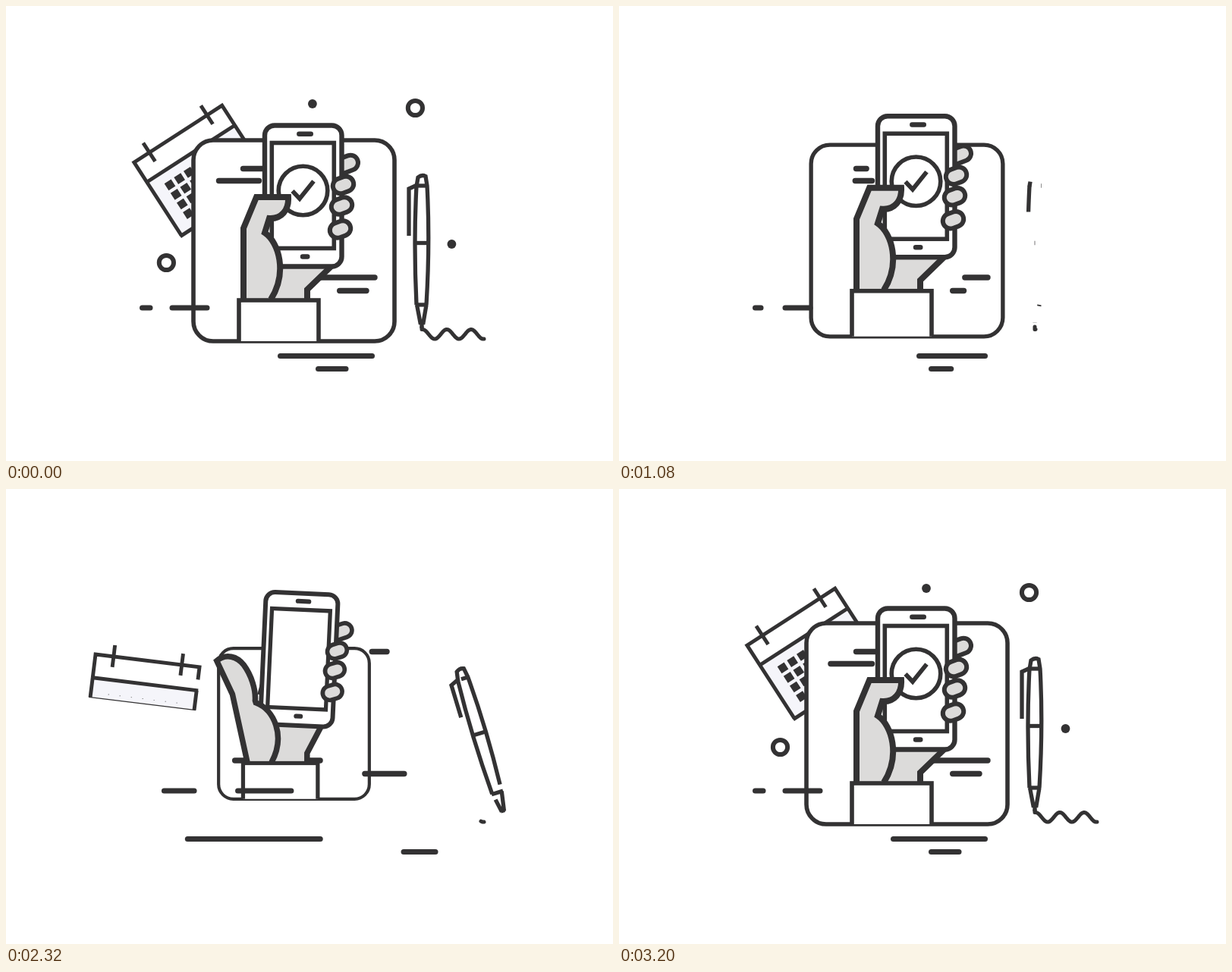
An HTML page that plays this animation: 800x600 px, repeating every 3240 ms.

```html
<!DOCTYPE html>
<html lang="en">
<head>
<meta charset="utf-8">
<title>Phone approval loop</title>
<style>
  html, body { margin: 0; width: 100%; height: 100%; overflow: hidden; background: #fff; }
  svg { display: block; width: 100vw; height: 100vh; }
</style>
</head>
<body>
<svg viewBox="0 0 800 600" fill="none" stroke="#333233" stroke-miterlimit="6">
  <defs>
    <clipPath id="window"><path id="windowShape"/></clipPath>
  </defs>

  <g id="calendar" stroke-width="4.9">
    <rect id="page" x="0" y="31" width="138" fill="#f5f5fa" stroke="none"/>
    <g id="cells" fill="#333233" stroke="none"></g>
    <path id="pageSides"/>
    <path id="pageFoot"/>
    <path id="header" pathLength="1" d="M0 31V0H138V31"/>
    <path id="divider" pathLength="1" d="M140 31H-2"/>
    <path id="pinLeft" pathLength="1" d="M24 -15V14"/>
    <path id="pinRight" pathLength="1" d="M114.5 -15V14"/>
  </g>

  <rect id="card" x="-132.5" y="-132.5" width="265" height="265" rx="26" fill="#fff" stroke-width="5.6"/>
  <g id="linesBack" stroke-width="7.4" stroke-linecap="round"></g>

  <g id="handLayer" clip-path="url(#window)">
    <g id="hand">
      <path id="wrist" fill="#dcdbda" stroke="none"/>
      <path id="wristEdge" stroke-width="8"/>
      <g id="phone">
        <g id="indexFinger"></g>
        <rect x="341" y="157.5" width="101.5" height="186" rx="13" fill="#fff" stroke-width="6.4"/>
        <path d="M386.3 168.7H401.8M391 330.5H397.3" stroke-width="6.4" stroke-linecap="round"/>
        <rect x="350.3" y="180.5" width="82" height="139" fill="#fff" stroke-width="5.6"/>
        <g id="badge"><circle r="32.3" fill="#fff" stroke-width="5.6"/></g>
        <path id="check" pathLength="1" d="M377.5 244L387 254L405.5 231" stroke-width="5.8"/>
        <g id="fingers"></g>
      </g>
      <path id="thumb" fill="#dcdbda" stroke-width="8"/>
      <rect x="307" y="388" width="105" height="260" fill="#fff" stroke-width="5.6"/>
    </g>
  </g>

  <g id="linesFront" stroke-width="7" stroke-linecap="round"></g>
  <path id="wave" stroke-width="5" stroke-linecap="round" stroke-linejoin="round"/>
  <g id="pen" stroke-width="5.3"></g>
  <g id="floaters"></g>
</svg>

<script>
const LOOP = 3240, ENTRY = 1840, CX = 379.5, CY = 309.5, DARK = '#333233', SKIN = '#dcdbda';
const $ = id => document.getElementById(id);
const clamp = u => Math.max(0, Math.min(1, u));
const mix = (a, b, u) => a + (b - a) * u;
const span = (t, start, length) => clamp((t - start) / length);
const easeInOut = u => u < .5 ? 2 * u * u : 1 - 2 * (1 - u) ** 2;
const easeOut = (u, power = 3) => 1 - (1 - u) ** power;
const backIn = (u, pull) => u ** 3 * ((pull + 1) * u - pull);
const show = (el, on) => el.setAttribute('visibility', on ? 'visible' : 'hidden');
const set = (el, attrs) => { for (const k in attrs) el.setAttribute(k, attrs[k]); };

function add(parent, tag, attrs = {}) {
  const el = document.createElementNS('http://www.w3.org/2000/svg', tag);
  set(el, attrs);
  return parent.appendChild(el);
}

// Smooth keyframes [time, ...values] without overshoot.
function track(t, keys) {
  const n = keys.length - 1;
  if (t <= keys[0][0]) return keys[0].slice(1);
  if (t >= keys[n][0]) return keys[n].slice(1);
  let i = 0;
  while (t >= keys[i + 1][0]) i++;
  const slope = (j, c) => (keys[j + 1][c] - keys[j][c]) / (keys[j + 1][0] - keys[j][0]);
  const tangent = (j, c) => {
    if (j === 0 || j === n) return 0;
    const a = slope(j - 1, c), b = slope(j, c);
    return a * b <= 0 ? 0 : 2 * a * b / (a + b);
  };
  const h = keys[i + 1][0] - keys[i][0], u = (t - keys[i][0]) / h;
  return keys[i].slice(1).map((v, k) => {
    const c = k + 1;
    return mix(v, keys[i + 1][c], u * u * (3 - 2 * u))
      + h * u * (1 - u) * ((1 - u) * tangent(i, c) - u * tangent(i + 1, c));
  });
}

// Shows the share p of a path, growing from position c along it.
function trim(el, p, c = 0) {
  const whole = p > .998;
  show(el, p > .002);
  set(el, { 'stroke-dasharray': whole ? 'none' : `${p} 2`, 'stroke-dashoffset': whole ? 0 : -c * (1 - p) });
}

// ---- Calendar: [time, centre x, centre y, angle, scale] ----
const calendarRest = [258, 217, -32.9, 1];
const calendarLeave = [[420, ...calendarRest], [840, 263, 163, 4.2, .885], [1090, 345, 260, 25, .4]];
const calendarEnter = [[2000, 166.4, 174, -8, .86], [2320, 179.5, 283.5, 7, 1],
  [2600, 215, 267.4, -3.3, 1], [2920, ...calendarRest]];
const cells = Array.from({ length: 28 }, (_, i) => {
  const row = Math.floor(i / 7);
  return { row, x: 23.5 + 15.1 * (i % 7), y: 50.5 + 15 * row, el: add($('cells'), 'rect') };
});

function drawCalendar(t) {
  const on = t < 1090 || t >= ENTRY;
  $('calendar').style.display = on ? '' : 'none';
  if (!on) return;
  const [x, y, angle, s] = track(t, t < ENTRY ? calendarLeave : calendarEnter);
  set($('calendar'), { transform: `translate(${x} ${y}) rotate(${angle}) scale(${s}) translate(-69 -57.5)` });

  const T = t < ENTRY ? LOOP : t;
  const [height, foot] = track(T, [[2200, 0, 0], [2320, 26, 1.4], [2560, 84, 4.9]]);
  const bottom = 31 + height;
  for (const id of ['page', 'pageSides', 'pageFoot']) show($(id), height > .5);
  set($('page'), { height });
  set($('pageSides'), { d: `M0 31V${bottom}M138 31V${bottom}` });
  set($('pageFoot'), { d: `M-2 ${bottom}H140`, 'stroke-width': foot });
  for (const { row, x, y, el } of cells) {
    const full = 10.6 * span(T, 2290 + 30 * row, 360);
    const size = y + full / 2 < bottom ? full : 0;
    set(el, { x: x - size / 2, y: y - size / 2, width: size, height: size });
  }
  trim($('divider'), easeOut(span(T, 1880, 230)));
  trim($('header'), span(T, 2010, 334));
  for (const id of ['pinLeft', 'pinRight']) trim($(id), span(T, 1920, 170));
}

// ---- Card, hand and phone ----
const handRise = [[2080, 180], [2320, -21.6], [2600, 19], [2940, 0]];
const phoneTilt = [[2080, -8, -6, -8], [2320, -5.8, -8.3, 2.6], [2600, 6, 7.5, 5.65], [2920, 0, 0, 0]];
const thumbOpen = 'M313 387L292 291L270 244C283 233 299 238 308 250C319 265 325 285 324 300L325 303C351 313 367 350 347 387';
const thumbClosed = 'M313 387L313 293L330 252C345 252 360 252 372 252C373 269 363 281 347 280L341 299C360 312 371 352 349 387';

function addFinger(parent, x1, y1, x2, y2) {
  for (const [stroke, width] of [[DARK, 26], [SKIN, 14]])
    add(parent, 'path', { d: `M${x1} ${y1}L${x2} ${y2}`, stroke, 'stroke-width': width, 'stroke-linecap': 'round' });
}
addFinger($('indexFinger'), 440, 212, 454, 206.7);
for (const [x, y] of [[444.5, 236], [442.5, 263.5], [440.5, 294.5]])
  addFinger($('fingers'), x - 3.7, y + 1.3, x + 3.7, y - 1.3);

// Blends two paths of the same structure; the upper part leans sideways.
function morph(from, to, u, lean) {
  const number = /[\d.]+/g, target = to.match(number).map(Number);
  let i = 0;
  return from.replace(number, v => {
    const shift = i % 2 ? 0 : lean * clamp((305 - target[i + 1]) / 40);
    return mix(+v, target[i++] + shift, u);
  });
}

function drawCardAndHand(t) {
  const entering = t >= ENTRY, T = entering ? t : LOOP;
  const leave = span(t, 560, 860);
  const s = entering ? easeOut(span(t, 2080, 820), 4) : 1 - backIn(leave, 1);
  const on = s > .004;
  $('card').style.display = $('handLayer').style.display = on ? '' : 'none';
  if (!on) return;
  set($('card'), { transform: `translate(${CX} ${CY}) scale(${s})` });

  // The hand may stick out sideways above the middle of the card, never below.
  const h = 132.5 * s, r = 26 * s, L = CX - h, R = CX + h, B = CY + h;
  set($('windowShape'), { d: `M${L - h} -50H${R + h}V${CY}H${R}V${B - r}A${r} ${r} 0 0 1 ${R - r} ${B}` +
    `H${L + r}A${r} ${r} 0 0 1 ${L} ${B - r}V${CY}H${L - h}Z` });

  const dy = entering ? track(t, handRise)[0] : 400 * backIn(leave, 1.88);
  const scale = easeOut(span(T, 2080, 480), 4);
  set($('hand'), { transform: `translate(394 ${CY + dy}) scale(${scale}) translate(-394 ${-CY})` });
  const [px, py, angle] = track(T, phoneTilt);
  set($('phone'), { transform: `translate(${px} ${py}) rotate(${angle} 394 249.5)` });

  const grip = easeInOut(span(T, 2350, 230));
  const heel = `${mix(416, 430, grip)} ${mix(338, 342, grip)}L397 374V390`;
  set($('thumb'), { d: morph(thumbOpen, thumbClosed, grip, angle * 1.2) });
  set($('wrist'), { d: `M320 310L345 300L${heel}H320Z` });
  set($('wristEdge'), { d: `M${heel}M331 292L339 262` });

  const pop = easeOut(span(T, 2420, 160));
  show($('badge'), pop > 0);
  set($('badge'), { transform: `translate(391.5 243.5) scale(${pop})` });
  trim($('check'), easeInOut(span(T, 2640, 200)));
}

// ---- Dashes: one end leads, the other follows; on leaving it joins the leader ----
const dashes = [
  { y: 214.5, from: 502, lead: 312.5, tail: 345, start: 2190 },
  { y: 230.5, from: 250, lead: 333.5, tail: 280.5, start: 2470 },
  { y: 358, from: 299, lead: 486, tail: 414, start: 2000 },
  { y: 375.5, from: 526, lead: 439.7, tail: 475, start: 2000 },
  { y: 398, from: 249, lead: 179.5, tail: 190, start: 2010 },
  { y: 398, from: 376, lead: 219, tail: 265, start: 2050 },
  { y: 461.5, from: 231, lead: 482.5, tail: 361.5, start: 1960 },
  { y: 478.5, from: 566, lead: 411.5, tail: 448, start: 2110 }];
for (const d of dashes) {
  d.outer = d.y > 390;
  d.el = add($(d.outer ? 'linesFront' : 'linesBack'), 'path');
}

function drawDashes(t) {
  for (const { y, from, lead, tail, start, outer, el } of dashes) {
    const entering = t >= ENTRY;
    const a = entering ? mix(from, lead, easeInOut(span(t, start, 570))) : lead;
    const b = entering ? mix(from, tail, easeInOut(span(t, start + 260, 560)))
      : mix(tail, lead, easeInOut(span(t, outer ? 840 : 760, outer ? 640 : 590)));
    show(el, Math.abs(a - b) > .05);
    set(el, { d: `M${a} ${y}H${b}` });
  }
}

// ---- Pen and the wave it writes: [time, centre x, centre y, angle] ----
const penPath = [[2000, 625.5, 332, 28.5], [2320, 626.7, 331.5, -16.8], [2600, 588, 326, 0], [2960, 548, 322, 0]];
// Drawn in this order; each stroke grows from its anchor.
const penStrokes = [
  { anchor: 0, d: 'M541 237Q537 312 541 394' },
  { anchor: .5, d: 'M540 394H556' },
  { anchor: 0, d: 'M541 238L543 226Q548 222 553 224.5L555 237Q559 312 554 394' },
  { anchor: .5, d: 'M538 312.5H558' },
  { anchor: 1, d: 'M541.5 394L546 417.5H550L554 394' },
  { anchor: 0, d: 'M542 236L531 241V303' },
  { anchor: 1, d: 'M540 237H557' },
  { anchor: 0, d: 'M548 417V425' }];
for (const p of penStrokes) p.el = add($('pen'), 'path', { d: p.d, pathLength: 1 });

function drawPen(t) {
  const entering = t >= ENTRY, T = entering ? t : LOOP;
  const [x, y, angle] = track(T, penPath);
  set($('pen'), { transform: `translate(${x} ${y}) rotate(${angle}) translate(-548 -322)` });
  penStrokes.forEach(({ el, anchor }, i) => trim(el, entering
    ? easeOut(span(t, ENTRY + 45 * i, 500), 2)
    : 1 - easeInOut(span(t, Math.max(540, 840 - 150 * i), i < 2 ? 360 : 620)), anchor));

  const on = entering ? t >= 2300 : t < 1110;
  show($('wave'), on);
  if (!on) return;
  const start = Math.min(626, x);
  const end = entering ? 630 : mix(630, 548, easeInOut(span(t, 400, 740)));
  const points = T >= 2560 ? [`${x} ${y + 101}`] : [];
  for (let k = 0; k <= 60; k++) {
    const wx = mix(start, end, k / 60);
    points.push(`${wx} ${432.8 + 6.3 * Math.cos((wx - 565) / 16 * Math.PI)}`);
  }
  set($('wave'), { d: 'M' + points.join('L') });
}

// ---- Floating rings and dots ----
const floaters = [
  { ring: true, born: 2580, from: [500, 176], rest: [540.5, 136.5] },
  { ring: true, born: 2440, from: [293, 288], rest: [212.5, 340.5] },
  { born: 2440, from: [286, 197], rest: [405, 131] },
  { born: 2400, from: [457, 290], rest: [588.5, 316] }];
for (const f of floaters)
  f.el = add($('floaters'), 'circle', f.ring
    ? { r: 9.6, fill: '#fff', 'stroke-width': 6 }
    : { r: 5.9, fill: DARK, stroke: 'none' });

function drawFloaters(t) {
  const T = t < ENTRY ? t + LOOP : t;
  const travel = easeInOut(span(T, 2560, 620)), drift = easeOut(span(T, 3200, 500));
  for (const { el, born, from, rest } of floaters) {
    const x = mix(from[0], rest[0], travel) - 5 * drift;
    const y = mix(from[1], rest[1], travel) - 9 * drift;
    const s = easeOut(span(T, born, 200)) * (1 - easeInOut(span(T, 3260, 440)));
    show(el, s > .01);
    set(el, { transform: `translate(${x} ${y}) scale(${s})` });
  }
}

function draw(t) {
  drawCalendar(t);
  drawCardAndHand(t);
  drawDashes(t);
  drawPen(t);
  drawFloaters(t);
}

let began;
function frame(now) {
  began ??= now;
  draw((now - began) % LOOP);
  requestAnimationFrame(frame);
}
draw(0);
requestAnimationFrame(frame);
</script>
</body>
</html>
```
